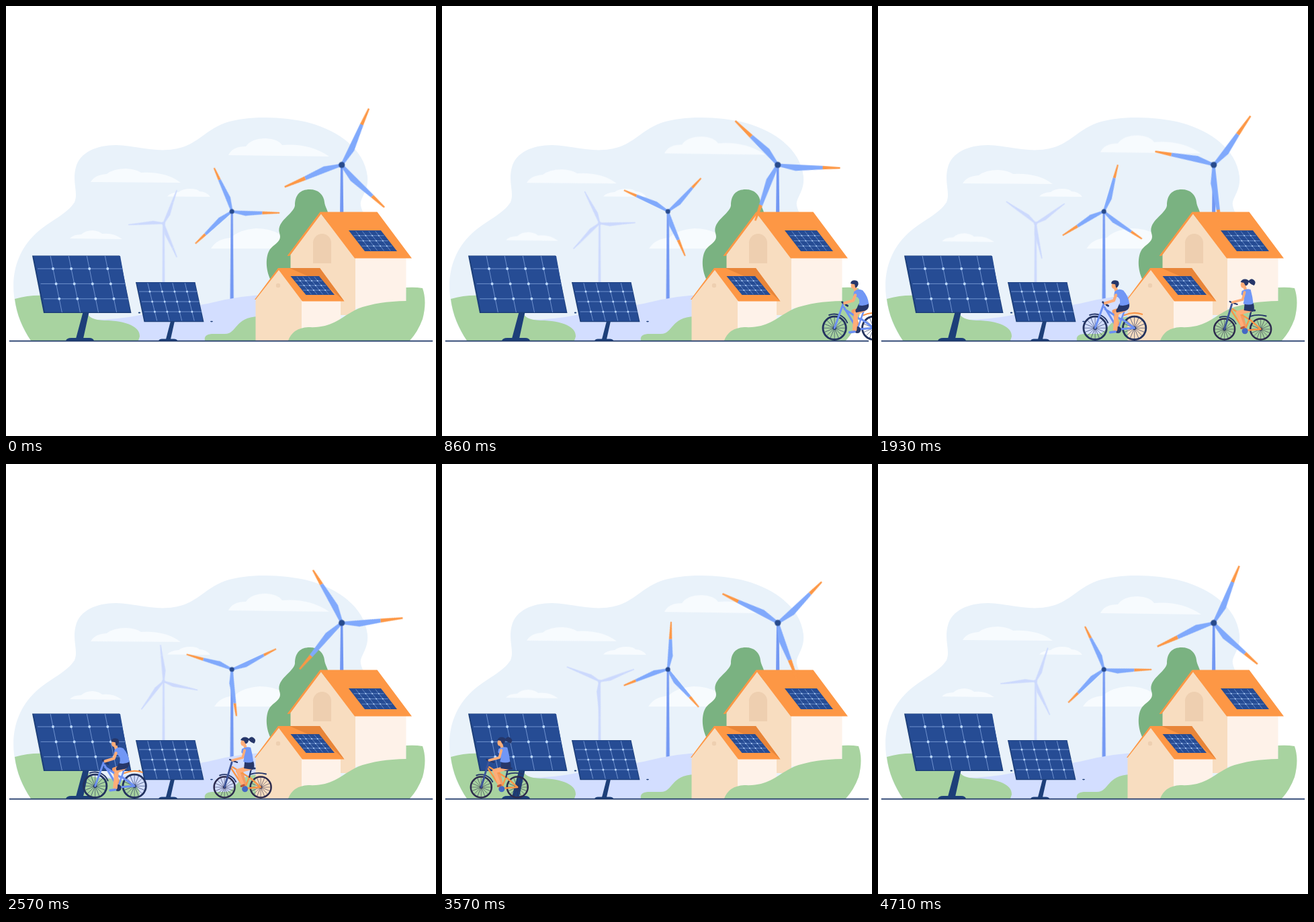
These frames come from a looping animation (640x640 px, 4780 ms). An HTML page:

```html
<!DOCTYPE html>
<html lang="en">
<head>
<meta charset="utf-8">
<title>Green energy village</title>
<style>
  html, body { margin: 0; height: 100%; overflow: hidden; background: #fff; }
  svg { display: block; width: 100%; height: 100%; }

  .spin { animation: spin 4780ms -5ms infinite; }
  @keyframes spin {
    0% { transform: rotate(0deg); animation-timing-function: steps(1); }
    1.4925% { transform: rotate(7.8deg); animation-timing-function: steps(66); }
    100% { transform: rotate(363.8deg); }
  }

  .cloud { fill: #f7fbfe; animation: drift 4780ms infinite; }
  @keyframes drift {
    0% { transform: none; animation-timing-function: ease-out; }
    43% { transform: translate(var(--dx, 0px), var(--dy, 0px)); animation-timing-function: ease-in-out; }
    100% { transform: none; }
  }

  .turbine { --blade: #80a9fc; --tip: #fd9745; --tower: #7398f3; --hub: #274a8c; }
  .far { --blade: #ccd9fd; --tip: #ccd9fd; --tower: #ccd9fd; --hub: #ccd9fd; }
  .blade { fill: var(--blade); }
  .tip { fill: var(--tip); }
  .tower { fill: var(--tower); }
  .hub { fill: var(--hub); }

  .green { fill: #a8d3a0; }
  .orange { fill: #fd9745; }
  .wall { fill: #f8ddc0; }
  .side { fill: #fef2e9; }
  .opening { fill: #eecfb0; }
  .cell { fill: #264c94; }
  .stand { fill: #1d3f79; }
  .grid path { fill: none; stroke: #9fc0f5; stroke-width: var(--line, .6px); vector-effect: non-scaling-stroke; }
  .grid .dots { stroke: #bcd9ff; stroke-width: var(--dot, 4px); stroke-linecap: round; }
  .roof-grid { --dot: 1.8px; --line: .5px; }

  .line { fill: none; stroke-linecap: round; stroke-linejoin: round; }
  .tyre { stroke: var(--tyre, #24335f); }
  .navy { stroke: #26376a; }
  .blue { stroke: #6c90f2; }
  .amber { stroke: #fb9648; }
  .skin { stroke: #ffad78; }
  .shade { stroke: #f49c66; }
  .face { fill: #ffad78; }
  .dark { fill: #26376a; }
  .shirt { fill: #7197f5; }
</style>
</head>
<body>
<svg viewBox="0 0 640 640">
  <defs>
    <g id="rotor">
      <g class="blade">
        <path d="M-1.8 0L-1.8-67 3.4-67 7.5-27 2 0z"/>
        <path d="M-1.8 0L-1.8-65 3.5-65 7.5-26 2 0z" transform="rotate(109.2)"/>
        <path d="M-1.8 0L-1.8-58 4-58 7.5-26 2 0z" transform="rotate(223.2)"/>
      </g>
      <g class="tip">
        <path d="M-1.8-67L-1.2-93H1.2L3.4-67z"/>
        <path d="M-1.8-65L-1.2-89.5H1.2L3.5-65z" transform="rotate(109.2)"/>
        <path d="M-1.8-58L-1.2-91H1.2L4-58z" transform="rotate(223.2)"/>
      </g>
    </g>
    <g id="grid" class="grid">
      <path d="M1 .15V3.9M2 .15V3.9M3 .15V3.9M4 .15V3.9M.15 1H4.8M.15 2H4.8M.15 3H4.8"/>
      <path class="dots" d="M1 1h0M2 1h0M3 1h0M4 1h0M1 2h0M2 2h0M3 2h0M4 2h0M1 3h0M2 3h0M3 3h0M4 3h0"/>
    </g>
    <path id="cross" d="M-16 0H16M0-16V16M-11.3-11.3L11.3 11.3M-11.3 11.3L11.3-11.3"/>
    <g id="wheel" class="line tyre">
      <g stroke-width=".6"><use href="#cross"/><use href="#cross" transform="rotate(22.5)"/></g>
      <circle r="17.2" stroke-width="2.8"/>
      <circle r="1.6" stroke-width="2"/>
    </g>
  </defs>

  <path fill="#e9f2fa" d="M37 498C24 480 15 458 12 432C8 398 17 364 45 338C65 320 92 309 102 292C108 278 98 262 104 240C110 218 134 207 164 207C195 208 220 218 250 213C284 208 294 186 326 174C360 163 412 164 452 174C498 187 534 215 538 254C540 276 526 286 528 297C532 318 560 340 580 372C590 396 596 410 596 440L600 498z"/>

  <path class="cloud" style="--dy:-4.5px" d="M331 222Q337 209 357 209Q365 197 387 197Q405 198 411 207Q452 204 481 224z"/>
  <path class="cloud" style="--dy:2px" d="M126 262Q132 251 150 250Q160 242 179 242Q194 243 201 248Q238 246 260 263z"/>
  <path class="cloud" d="M240 283.5q5-6 17-6.5q6-5 17-5q11 0 14 4q10 0 16 8z"/>
  <path class="cloud" style="--dy:4.3px" d="M95 346Q100 340 112 340Q118 334 129 334Q139 335 143 339Q160 337 173 347z"/>
  <path class="cloud" style="--dx:5.5px" d="M305 361Q314 346 335 345Q346 333 372 331Q392 331 406 339L430 361z"/>

  <g class="turbine far" transform="translate(234.5 323.5)">
    <path class="tower" d="M-1.3 0H1.3L2 110H-2z"/>
    <g transform="rotate(158.6) scale(.585)"><use class="spin" href="#rotor"/></g>
    <circle class="hub" r="2.5"/>
  </g>

  <g class="turbine" transform="translate(336.2 305.7)">
    <path class="tower" d="M-1.5 0H1.5L2.6 132H-2.6z"/>
    <g transform="rotate(228.6) scale(.78)"><use class="spin" href="#rotor"/></g>
    <circle class="hub" r="3.5"/>
  </g>

  <path fill="#d3deff" d="M130 467Q165 467 200 460L300 443Q352 429 400 430V498H130z"/>
  <path class="green" d="M37 498C25 480 16 460 13 436Q40 428 70 432Q108 438 121 457Q124 467 146 468C180 468 200 478 199 492L197 498z"/>
  <path class="green" d="M296 498Q294 489 306 488H326C344 488 340 463 376 462V498z"/>

  <!-- solar panels -->
  <path class="stand" d="M114.5 456H123.5L115 495H104z"/>
  <path class="stand" d="M89 498.5Q90 494 97 494H124Q130 494 131 498.5z"/>
  <path class="stand" d="M39 371.5H169L186.5 457H56z"/>
  <path class="cell" d="M41 372H170L185 455.5H58z"/>
  <use href="#grid" transform="matrix(27.1 0 4.6 22.4 38.3 368.6)"/>
  <path class="stand" d="M245 469H251L245 496H238z"/>
  <path class="stand" d="M227 498.5Q228 495.5 232 495.5H250Q254 495.5 255.5 498.5z"/>
  <path class="stand" d="M193 411H281.5L294.5 470.3H205.5z"/>
  <path class="cell" d="M194.5 411.5H281L293 469H207z"/>
  <use href="#grid" transform="matrix(18.5 0 3.7 15 191.8 410)" style="--dot:3px"/>
  <ellipse class="stand" cx="198.5" cy="456.5" rx="1.8" ry=".9"/>
  <ellipse class="stand" cx="306" cy="469.6" rx="2" ry=".8"/>

  <path fill="#7ab281" d="M394 408C386 392 386 372 393 362C402 352 411 350 407 338C402 320 428 310 430 297C430 281 438 273 452 273C465 273 473 281 474 292C475 300 480 304 482 320L440 410z"/>

  <g class="turbine" transform="translate(499.7 236.5)">
    <path class="tower" d="M-1.7 0H1.7L2.6 72H-2.6z"/>
  </g>

  <!-- big house -->
  <path class="wall" d="M423.5 370L468 308L520 375V460H423.5z"/>
  <path class="side" d="M520 375H595.5V450H520z"/>
  <path class="orange" d="M467.5 306.5H552.5L604 375.5H519L469 309.5L422 372H418.5z"/>
  <path class="opening" d="M457 383V352.5a13.5 13.5 0 0 1 27 0V383z"/>
  <path class="cell" d="M510 334H558L582 365H534z"/>
  <use class="roof-grid" href="#grid" transform="matrix(9.7 0 6 7.75 510 334)"/>

  <!-- small house -->
  <path class="wall" d="M371.5 436L406 391L440 437V498H371.5z"/>
  <path class="side" d="M440 438H498V498H440z"/>
  <path class="orange" d="M405 390H467L503.5 439.5H441L406 393L371.5 437H370z"/>
  <path fill="#e88539" d="M422 390H467L503.5 439.5L474 413z"/>
  <circle class="opening" cx="405" cy="416" r="3.2"/>
  <path class="cell" d="M423.5 402H466L489 430H446.5z"/>
  <use class="roof-grid" href="#grid" transform="matrix(8.6 0 5.75 7 423.5 402)"/>

  <g class="turbine" transform="translate(499.7 236.5)">
    <g transform="rotate(25.7)"><use class="spin" href="#rotor"/></g>
    <circle class="hub" r="4.6"/>
  </g>

  <path class="green" d="M420 498Q427 479 450 478C488 480 497 463 525 450Q554 439.5 595.5 439V419Q609 418 620 420Q627 440 620 466Q613 485 601 498z"/>
  <path class="line" stroke="#1d3768" stroke-width="1.7" d="M5.5 498.6H634.5"/>

  <g id="riders" transform="translate(666 0)">
    <!-- man -->
    <g transform="translate(0 479.3)">
      <use href="#wheel"/>
      <use href="#wheel" x="58.5"/>
      <g class="line">
        <path class="navy" stroke-width="2" d="M-8-19.3A21 21 0 0 1 19-8"/>
        <path class="amber" stroke-width="2.2" d="M43-19Q57-25 70-20.5"/>
        <path class="shade" stroke-width="5.5" d="M44-30L28-25L34-4"/>
        <path class="blue" stroke-width="3" d="M13-36L0 0M14-31L34 2L58.5 0L39-14M15-28L38-13"/>
        <path class="blue" stroke-width="2.5" d="M34 2L43-24"/>
        <path class="navy" stroke-width="2.8" d="M11.5-38.5L13.5-37M17-34.5L19.5-33"/>
        <path class="navy" stroke-width="1.4" d="M13-37L18-34"/>
      </g>
      <circle class="dark" cx="34" cy="2.8" r="5"/>
      <g class="line">
        <path class="skin" stroke-width="6.5" d="M44-28L32-22L30 2"/>
        <path class="blue" stroke-width="3.5" d="M22.5 6.5L30 5.5"/>
        <path class="skin" stroke-width="5" d="M30-61L32-54"/>
      </g>
      <path class="dark" d="M36-36L51-37Q52-27 45-25.5L32-23Q30-27 33-29z"/>
      <path class="shirt" d="M29-54Q35-60 42-56Q50-47 51-36Q44-32 36-34Q39-42 34-46L28-48z"/>
      <path class="line skin" stroke-width="4.2" d="M31-49L28-41L15-37"/>
      <ellipse class="face" cx="28.5" cy="-63" rx="4" ry="5"/>
      <path class="dark" d="M24-66Q24-71 30-71Q36-71 35.5-65Q34-60 31-60L30-65z"/>
    </g>

    <!-- woman -->
    <g transform="translate(192.5 481)" style="--tyre:#2d2b4d">
      <use href="#wheel" transform="scale(.9)"/>
      <use href="#wheel" transform="translate(54) scale(.9)"/>
      <g class="line">
        <path class="navy" stroke-width="1.9" d="M-7-17.5A19 19 0 0 1 17-8M38-19Q50-23 62-19.5"/>
        <path class="shade" stroke-width="5" d="M40-29L25-25L30-5"/>
        <path class="amber" stroke-width="2.4" d="M10-28L30 2L54 0L37-15L30 2M12-30L36-15"/>
        <path stroke="#3c5499" stroke-width="2.8" d="M11-37L8-27L0 0"/>
        <path class="navy" stroke-width="2.2" d="M8-41L13-39L19-37M37-15L40-28"/>
        <path class="navy" stroke-width="3" d="M37-28H45"/>
      </g>
      <circle cx="30.5" cy="2.8" r="4.5" fill="#4468c4"/>
      <g class="line">
        <path class="skin" stroke-width="6.5" d="M39-29L20-24"/>
        <path class="skin" stroke-width="5" d="M20-23L27-4"/>
        <path stroke="#b9583f" stroke-width="3" d="M25-1.5L29-3"/>
        <path class="skin" stroke-width="4.5" d="M30-63L32-56"/>
      </g>
      <path class="dark" d="M30-38L43-39Q46-30 42-26L29-28z"/>
      <path class="shirt" d="M26-57Q33-61 39-59Q42-48 43-38Q36-35 28-38Q31-46 25-52z"/>
      <path class="line skin" stroke-width="3.6" d="M30-55L27-44L12-40"/>
      <ellipse class="face" cx="28" cy="-66" rx="3.8" ry="4.8"/>
      <path class="dark" d="M24-70Q26-75 31-74.5Q35-74 36-72Q40-77 44-73Q48-70 44-65Q40-66 36-70Q35-64 31-65L29-69z"/>
    </g>
  </g>
</svg>
<script>
  const LOOP = 4780, FPS = 14, LAST = 66;
  const riders = document.getElementById('riders');

  // The ride eases in and out, moving on in whole steps.
  function tick(now) {
    const step = Math.floor((now % LOOP + 5) * FPS / 1000);
    const p = step / LAST;
    const x = 666 - 939 * p * p * (3 - 2 * p);
    riders.setAttribute('transform', `translate(${x.toFixed(2)} 0)`);
    requestAnimationFrame(tick);
  }
  requestAnimationFrame(tick);
</script>
</body>
</html>
```
